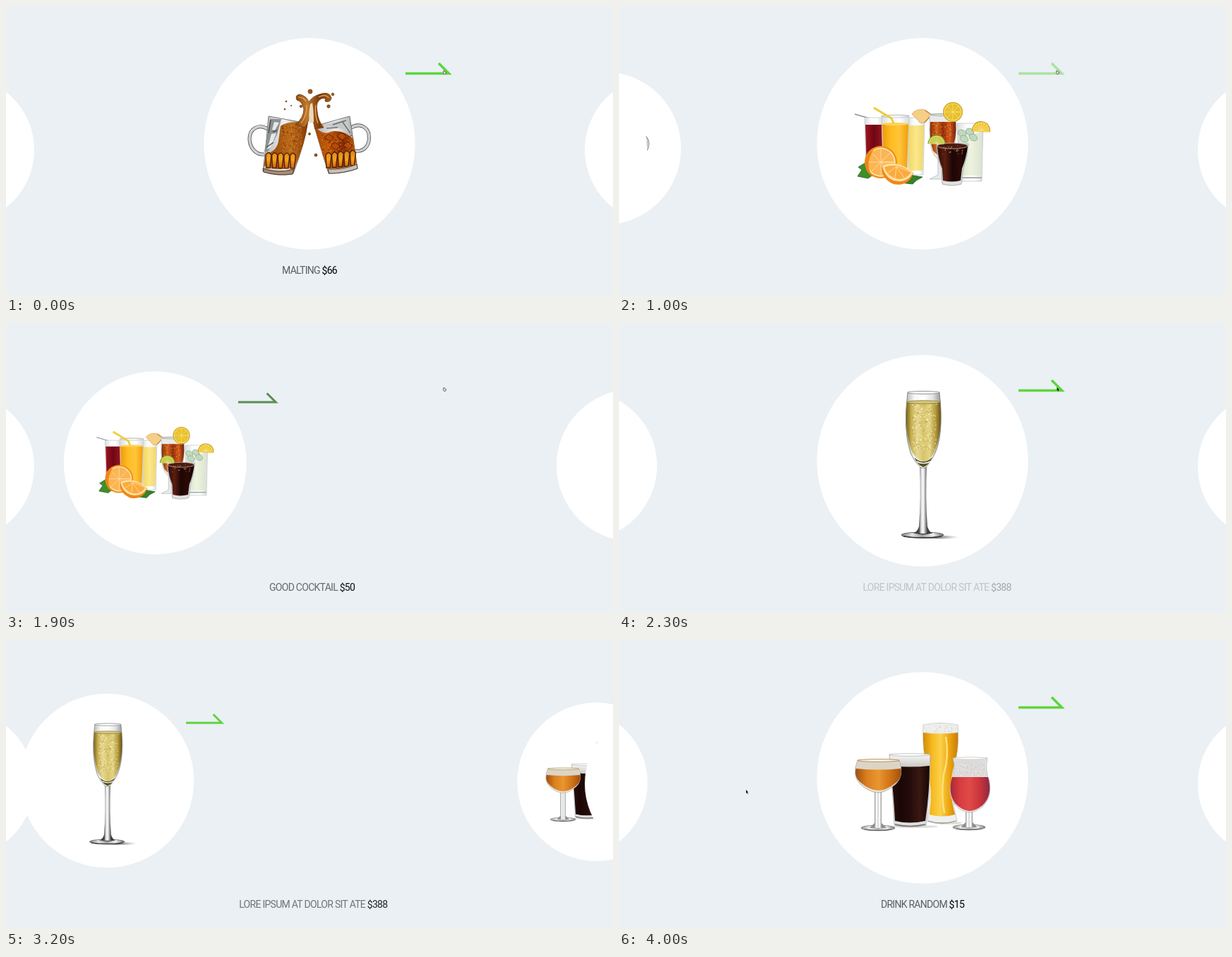
Recreate the animation shown at these times as an HTML page with a canvas. Size 860 by 409 pixels, loop 4.1 s.

```html
<!DOCTYPE html>
<html lang="en">
<head>
<meta charset="utf-8">
<title>Drinks carousel</title>
<style>
html, body { margin: 0; width: 100%; height: 100%; overflow: hidden; background: #eaf0f4; }
canvas { display: block; }
</style>
</head>
<body>
<canvas width="860" height="409"></canvas>
<script>
const ctx = document.querySelector('canvas').getContext('2d');
const LOOP = 4100, GREEN = [94, 213, 62], GREY = [88, 100, 94];
const clamp = v => Math.max(0, Math.min(1, v));
const mix = (a, b, k) => a + (b - a) * k;

// Drawing helpers
function shape(d, fill, line, width = 1) {
  const path = new Path2D(d);
  if (fill) { ctx.fillStyle = fill; ctx.fill(path); }
  if (line) { ctx.strokeStyle = line; ctx.lineWidth = width; ctx.stroke(path); }
}
function blend(gradient, colors) {
  colors.forEach((c, i) => gradient.addColorStop(i / (colors.length - 1), c));
  return gradient;
}
const across = (x0, x1, ...colors) => blend(ctx.createLinearGradient(x0, 0, x1, 0), colors);
const down = (y0, y1, ...colors) => blend(ctx.createLinearGradient(0, y0, 0, y1), colors);
function oval(x, y, rx, ry, fill, line, width = 1, turn = 0) {
  ctx.beginPath();
  ctx.ellipse(x, y, rx, ry, turn, 0, Math.PI * 2);
  if (fill) { ctx.fillStyle = fill; ctx.fill(); }
  if (line) { ctx.strokeStyle = line; ctx.lineWidth = width; ctx.stroke(); }
}
function specks(seed, n, x, y, w, h, colors) {
  const rnd = () => (seed = seed * 16807 % 2147483647) / 2147483647;
  for (let i = 0; i < n; i++) {
    ctx.fillStyle = colors[i % colors.length];
    ctx.fillRect(x + rnd() * w, y + rnd() * h, 1.2, 1.2);
  }
}
function citrus(x, y, r, rind, flesh, pith, from = 0, to = Math.PI * 2) {
  const slice = (size, color) => {
    ctx.beginPath();
    ctx.arc(x, y, size, from, to);
    ctx.fillStyle = color;
    ctx.fill();
  };
  slice(r, rind); slice(r * .9, pith); slice(r * .82, flesh);
  ctx.strokeStyle = pith;
  ctx.lineWidth = .8;
  ctx.beginPath();
  for (let i = 0; i <= 8; i++) {
    const a = from + (to - from) * i / 8;
    ctx.moveTo(x, y);
    ctx.lineTo(x + r * .82 * Math.cos(a), y + r * .82 * Math.sin(a));
  }
  ctx.stroke();
}

function ribs(x0, y0, slope) {
  for (let i = 0; i < 5; i++) {
    const x = x0 + i * 8.6, y = y0 + i * slope;
    shape(`M${x} ${y}Q${x + 4} ${y - 7} ${x + 8} ${y}L${x + 6} ${y + 18}H${x + 1}Z`,
      down(204, 230, '#d9820f', '#f4a320', '#c96207'), '#56200a', 1.4);
  }
}

function mugs() {
  // handles
  for (const d of ['M371 174C357 166 344.5 174 345 189C346 203 356 211 366 210',
    'M489 172C503 164 515 173 514.5 187C514 200 505 207 494 205']) {
    shape(d, null, '#4a4a4a', 5);
    shape(d, null, '#f0f0f0', 3.2);
    shape(d, null, '#8a8a8a', .7);
  }
  // left mug
  shape('M372 156L427 166Q424 192 407 237Q386 242 364 234L368 200Z',
    across(364, 425, '#aeb2b3', '#f1f2f2', '#8d8f8f'), '#5a5a5a', .8);
  shape('M374 160L390 160L384 182L371 206L366 206Z', '#8c9192');
  shape('M380 164L387 165L381 176L377 175ZM376 181L383 180L375 200L370 203Z', '#e6e8e8');
  shape('M375 161L372 180M378 178L384 176M369 200L379 193', null, '#474b4c', 1.4);
  shape('M389 170Q398 162 428 165Q423 198 409 228Q387 235 365 226L369 209Q384 205 386 191Z',
    across(365, 425, '#a85a10', '#a2540f', '#bd6d1c', '#8a3d08'));
  specks(17, 160, 390, 168, 28, 37, ['#dc8a28', '#6f2e06', '#c06c16']);
  ribs(368, 211, .2);
  shape('M364 230Q385 237 408 231L406 238Q385 241 365 235Z', '#a98b72', '#3d2617', .9);
  // right mug
  shape('M437 170L487 156L498 230Q480 237 457 237Q447 206 437 170Z',
    across(437, 498, '#a9abab', '#eee', '#999'), '#5a5a5a', .8);
  shape('M450 169L484 159L487 177L472 173Z', '#c4c8c9');
  shape('M463 168L482 162M476 163L488 180M454 173L470 172', null, '#696d6e', 1.4);
  shape('M436 169Q449 184 460 178Q476 174 492 188L497 222Q478 232 455 230Z',
    across(437, 497, '#a34606', '#c45d0a', '#862c04', '#c0610c'));
  specks(91, 90, 447, 182, 42, 24, ['#e59030', '#561a02']);
  for (const [x, y] of [[457, 186], [475, 184], [466, 198], [484, 197]])
    shape(`M${x - 6} ${y}L${x} ${y - 5}L${x + 7} ${y}L${x + 2} ${y + 6}Z`, '#b84c08', '#6a2002', 1);
  ribs(453, 211, -.8);
  shape('M456 231Q478 232 497 224L498 230Q479 237 458 237Z', '#c9c0b6', '#3b302a', .9);
  // splash
  shape('M410 168Q422 158 422 146Q420 135 412 133Q409 126 416 125Q427 128 429 136Q434 128 444 125Q458 120 461 130Q460 137 452 135Q454 129 447 131Q438 135 441 150Q442 162 450 172L438 174Q434 160 432 148Q430 164 423 172Z',
    across(410, 461, '#8a4710', '#c07a2b', '#7b390b', '#a8611c'), '#6b340c', .8);
  shape('M431 139Q428 154 430 166L436 164Q436 149 434 137Z', '#ead9bd');
  shape('M426 140Q427 154 418 166M439 140Q437 153 442 166M414 129Q422 129 425 135M443 129Q453 124 457 130',
    null, '#e5ad62', 1.2);
  for (const [x, y, r] of [[431, 121, 3], [463, 125, 1.8], [457, 142, 2.2], [418, 142, 1.8],
    [397, 135, 1], [395, 146, 1], [404, 141, .7], [439, 211, 2], [430, 181, 1.5]])
    oval(x, y, r, r, '#a05816', '#5c2c07', .7);
}

function tumbler(d, x0, x1) {
  shape(d, across(x0, x1, '#d8dddd', '#fafbfb', '#fff', '#d5dada'), '#c3c9ca', .8);
}

function cocktails() {
  // juices
  shape('M334 153L355 159', null, '#8c9095', 1.4);
  tumbler('M348 158H374V232H350Z', 348, 374);
  shape('M349 168H373V230H351Z', across(349, 373, '#a01320', '#6e0712', '#951522'));
  tumbler('M409 158H433L431 239H411Z', 409, 433);
  shape('M410 169H432L430 233H411Z', across(410, 432, '#f3d760', '#fae88c', '#f1d76c'));
  tumbler('M372 155H411L409 232H374Z', 372, 411);
  shape('M373 167H410L408 232H375Z', across(373, 410, '#ef9a0b', '#ffbd22', '#ffc53a', '#f29c0c'));
  oval(391.5, 167, 18.5, 2, '#ffd25a');
  oval(391.5, 156, 19.5, 2, null, '#b8bcbc', .8);
  shape('M361 144L386 159L389 166', null, '#f0cb32', 3);
  shape('M415 153Q420 145 434 147L443 154L432 165Q426 167 424 162Z', '#f6cf86', '#e0a057', .8);
  shape('M434 148L443 154L433 165', null, '#b98142', 1.3);
  // fruit
  shape('M352 220L339 228L344 232L338 241L353 244L361 238Z', '#3f8e2c', '#276a1d', .8);
  shape('M405 238L430 242L421 247L416 252L398 250Z', '#34822a', '#22601b', .8);
  citrus(371, 221, 23, '#f08e1b', '#fbb553', '#ffe3ae');
  shape('M361 203A23 23 0 0 0 349 226Q351 238 361 242Q346 226 361 203Z', '#ee8614');
  shape('M373 225Q370 244 389 252Q411 256 417 236Z', '#f08716');
  shape('M373 226Q393 217 417 235Q409 252 389 247Q376 242 373 226Z', '#ffe0a4');
  shape('M376 228Q395 221 414 235Q406 248 391 244Q379 239 376 228Z', '#fbab3e');
  shape('M393 227L380 237M393 227L391 244M393 227L404 243M393 227L414 235', null, '#ffdc9a', 1);
  // lemonade
  tumbler('M479 166H516L514 248H482Z', 479, 516);
  shape('M481 180H514L513 240H483Z', across(481, 514, '#d5dfca', '#eef3df', '#dbe4cf'));
  shape('M482 243H514', null, '#a8afaf', 2);
  for (const [x, y] of [[486, 180], [497, 178], [489, 188], [502, 186]])
    oval(x, y, 6, 4.5, '#c2d8be', '#7faa8d', .8, .5);
  citrus(513, 176, 13, '#c99a12', '#f0c736', '#f9e488', Math.PI * .96, Math.PI * 2.06);
  // iced tea
  shape('M440 153H477Q480 188 472 207Q464 217 461 217V239L470 245H440L452 239V217Q440 208 440 180Z',
    '#e8eaea', '#b4b9ba', .8);
  shape('M441 164H477Q479 187 471 205Q458 220 445 205Q439 187 441 164Z',
    across(440, 478, '#7c2608', '#d3681c', '#9a310a', '#d4591a', '#6c1d06'));
  specks(43, 36, 444, 164, 28, 26, ['#f2a654', '#611604']);
  oval(458, 154, 17, 1.5, null, '#999', .8);
  citrus(473, 150, 14, '#cfa516', '#e9c02d', '#f7e17c');
  // cola
  shape('M450 195H495Q494 213 488 229L485 252Q472 256 458 252L457 230Q450 213 450 195Z',
    '#dfe1e1', '#9b9e9e', .8);
  shape('M451 199H494Q492 215 486 230L484 247Q471 250 459 247L458 230Q452 216 451 199Z',
    across(451, 494, '#2c0d08', '#5c1e10', '#1c0604', '#2c0a07', '#0d0303'));
  oval(472.5, 198, 21.5, 4, '#4a1b10', '#c9b8b0', .8);
  specks(7, 24, 458, 196, 30, 14, ['#a2573c', '#d4a08a']);
  citrus(450, 195, 12.5, '#7d9f22', '#c0c63e', '#e4e28c', Math.PI, Math.PI * 2);
}

function champagne() {
  oval(455, 303, 26, 2.2, across(429, 481, '#555', '#999', '#fff'));
  // foot and stem
  oval(430, 300, 30, 4, across(400, 460, '#777', '#e4e4e4', '#9a9a9a', '#f2f2f2', '#666'), '#555', .9);
  shape('M403 302Q430 306 457 302M420 297Q430 300 442 297', null, '#333', 1.4);
  shape('M426 200H436Q434 250 437 288Q439 295 444 298H417Q423 295 425 288Q428 250 426 200Z',
    across(425, 437, '#444', '#d9d9d9', '#fff', '#a5a5a5', '#3c3c3c'));
  // bowl
  shape('M409 98H454Q461 160 446 188Q438 201 434 205H428Q419 197 413 184Q402 152 409 98Z',
    across(406, 457, '#aeb3b3', '#f8f8f8', '#fff', '#e4e6e6', '#8b8f8f'), '#777', .8);
  shape('M408 112H455Q459 158 445 186Q439 195 431 196Q420 193 414 180Q404 151 408 112Z',
    across(406, 457, '#6e5812', '#c9b353', '#e6d892', '#d7c36a', '#e3d385', '#b59b3c', '#5b480d'));
  specks(29, 170, 415, 114, 34, 66, ['#f8f0c4', '#b3973a', '#fffbe0']);
  oval(431.5, 112, 23.5, 2.2, '#d8c87c', '#81702c', .8);
  oval(431.5, 98.5, 22.5, 2, '#fff', '#777', .8);
  shape('M418 190Q431 202 444 190Q437 203 431 204Q424 202 418 190Z', '#57511f');
  shape('M422 196Q431 201 441 196', null, '#f3f3e8', 1.5);
}

function stemFoot(x, top, foot, half, w) {
  oval(x, foot, half, 3.8, across(x - half, x + half, '#8f9292', '#eee', '#a9acac', '#eee', '#777'), '#777', .8);
  shape(`M${x - w} ${top}L${x - w} ${foot - 7}L${x - half * .5} ${foot}H${x + half * .5}L${x + w} ${foot - 7}V${top}Z`,
    across(x - w, x + w, '#8d8d8d', '#fff', '#d5d7d7', '#fff', '#8d8d8d'));
  shape(`M${x - half + 5} ${foot + 2}Q${x} ${foot + 5} ${x + half - 5} ${foot + 2}`, null, '#555', 1.2);
}

function beers() {
  oval(420, 264, 32, 2, '#ddd');
  oval(466, 259, 20, 2, '#ddd');
  // wheat beer
  shape('M431 120Q456 115 480 120Q483 153 474 184Q468 213 479 256Q458 263 437 257Q444 217 436 182Q429 151 431 120Z',
    '#edf0f0', '#b8b8b8', .7);
  shape('M431 130H480Q482 156 473 184Q467 214 476 247Q458 252 440 247Q445 213 437 182Q430 155 431 130Z',
    across(431, 480, '#d08a09', '#f6b91c', '#fbd04a', '#eda510', '#c97d06'));
  shape('M432 120Q456 116 479 120L480 131Q456 134 431 131Z', '#ececea');
  specks(15, 35, 433, 121, 44, 9, ['#fff', '#ccc']);
  shape('M463 137Q468 165 460 190Q456 220 461 245', null, '#ffdf75', 2.5);
  shape('M438 256Q458 262 478 256', null, '#a8987a', 1.3);
  // stout
  shape('M383 162H441Q441 205 435 262Q412 267 390 262Q388 215 383 162Z', '#dce0e0', '#aaa', .8);
  shape('M384 177H440Q440 216 434 256Q412 261 391 256Q389 215 384 177Z',
    across(384, 440, '#30100c', '#1a0706', '#230c0a', '#3a1813', '#170605'));
  shape('M384 163H440V178Q412 181 385 178Z', down(163, 180, '#f5f5f3', '#c9c7c2'));
  oval(412, 162.5, 28.5, 1.8, '#fff', '#aaa', .7);
  shape('M391 261Q412 266 434 261', null, '#77716d', 1.6);
  // coupe
  stemFoot(367, 213, 266, 24, 5);
  shape('M338 170H397Q405 192 392 204Q378 216 367 216Q354 215 343 205Q329 193 338 170Z',
    '#e8e6e1', '#a89d8c', .8);
  shape('M336 181H399Q403 194 391 203Q379 213 367 213Q354 212 344 203Q332 194 336 181Z',
    across(334, 401, '#9a4c0e', '#d97f20', '#ea9630', '#cf7318', '#9d4d0f'));
  shape('M338 171H397L399 182Q367 185 336 182Z', '#dcd4c6');
  oval(367.5, 170.5, 29.5, 1.8, '#f8f6f1', '#b19054', 1);
  // tulip
  stemFoot(496, 241, 265, 23, 5);
  shape('M473 167H522Q518 184 525 200Q529 223 515 236Q505 244 496 244Q484 243 476 233Q464 217 472 196Q478 184 473 167Z',
    '#e4e6e6', '#b5b5b5', .8);
  shape('M472 194H523Q530 220 515 234Q505 242 496 242Q486 241 477 232Q465 217 472 194Z',
    across(468, 526, '#a52633', '#d63c40', '#e04a48', '#c9343c', '#8b2741'));
  shape('M475 170H519Q517 184 523 194H472Q478 184 475 170Z', '#dcdbd9');
  specks(63, 50, 478, 173, 39, 20, ['#f4f4f4', '#c3c2c0']);
  oval(497.5, 167.5, 24, 1.6, '#fff', '#bbb', .7);
}

const slides = [
  { art: mugs, name: 'MALTING', price: '$66', grey: [0, 400] },
  { art: cocktails, name: 'GOOD COCKTAIL', price: '$50', grey: [1600, 2080] },
  { art: champagne, name: 'LORE IPSUM AT DOLOR SIT ATE', price: '$388' },
  { art: beers, name: 'DRINK RANDOM', price: '$15' }
];
const starts = [686, 1825, 3088];

// away: 0 in the centre, 1 parked at the side
function drawSlide(slide, side, away, arrow, t) {
  ctx.save();
  ctx.translate(430 + side * 494 * away, 195 + 7 * away);
  const s = mix(1, .695, away);
  ctx.scale(s, s);
  oval(0, 0, 149.7, 149.7, '#fff');
  ctx.translate(-430, -195);
  slide.art();
  if (arrow > 0) {
    const k = slide.grey ? clamp((t - slide.grey[0]) / (slide.grey[1] - slide.grey[0])) : 0;
    ctx.globalAlpha = arrow;
    shape('M566 95.5H627.5L613 81', null, `rgb(${GREEN.map((g, i) => mix(g, GREY[i], k))})`, 3.5);
  }
  ctx.restore();
}

function caption({ name, price }, shift, alpha) {
  if (alpha <= 0) return;
  ctx.font = '14px Roboto, sans-serif';
  ctx.letterSpacing = '-0.73px';
  ctx.globalAlpha = alpha;
  const priceWidth = ctx.measureText(price).width;
  const nameWidth = ctx.measureText(name + ' ').width;
  const x = 430 - (nameWidth + priceWidth) / 2 + shift;
  ctx.fillStyle = '#5c5f61';
  ctx.fillText(name, x, 379);
  ctx.fillStyle = '#000';
  ctx.fillText(price, x + nameWidth, 379);
  ctx.globalAlpha = 1;
}

function cursor(t) {
  if (t < 2100) {
    shape('M619.5 92L621 91.5L621.5 93L623.5 93.5V95.5L622 96.5H620.5L619.5 94.5Z', '#ddd', '#444', .7);
    return;
  }
  let x = 620.5, y = 90.5;
  if (t > 2300) {
    const k = clamp((t - 2300) / 400);
    x = mix(x, -20, k * k);
    y = mix(y, 215, k);
  }
  if (t > 3500) {
    x = mix(-20, 180, clamp((t - 3500) / 400));
    y = 212;
  }
  shape(`M${x} ${y}V${y + 5}L${x + 1.2} ${y + 4}L${x + 2} ${y + 6}L${x + 2.8} ${y + 5.5}L${x + 2} ${y + 3.6}H${x + 3.2}Z`, '#111');
}

function draw(t) {
  ctx.fillStyle = '#eaf0f4';
  ctx.fillRect(0, 0, 860, 409);
  const step = starts.filter(s => t >= s).length;
  if (!step) {
    drawSlide(slides[0], 1, 0, 1, t);
    caption(slides[0], 0, 1);
  } else {
    const e = t - starts[step - 1], from = slides[step - 1], to = slides[step];
    drawSlide(from, -1, 1 - Math.exp(-e / 130), 1 - clamp((e - 130) / 100), t);
    drawSlide(to, 1, 1 - clamp(e / 248) ** 2.2, clamp((e - 250) / 140), t);
    caption(from, e * .047, 1 - (e / 300) ** 2);
    const u = clamp((e - 430) / 320);
    caption(to, 28 * (1 - u) ** 2, clamp(u * 2.1));
  }
  oval(-64, 203.5, 104, 104, '#fff');
  oval(924, 203.5, 104, 104, '#fff');
  cursor(t);
}

const begin = performance.now();
function tick() {
  draw((performance.now() - begin) % LOOP);
  requestAnimationFrame(tick);
}
tick();
</script>
</body>
</html>
```
